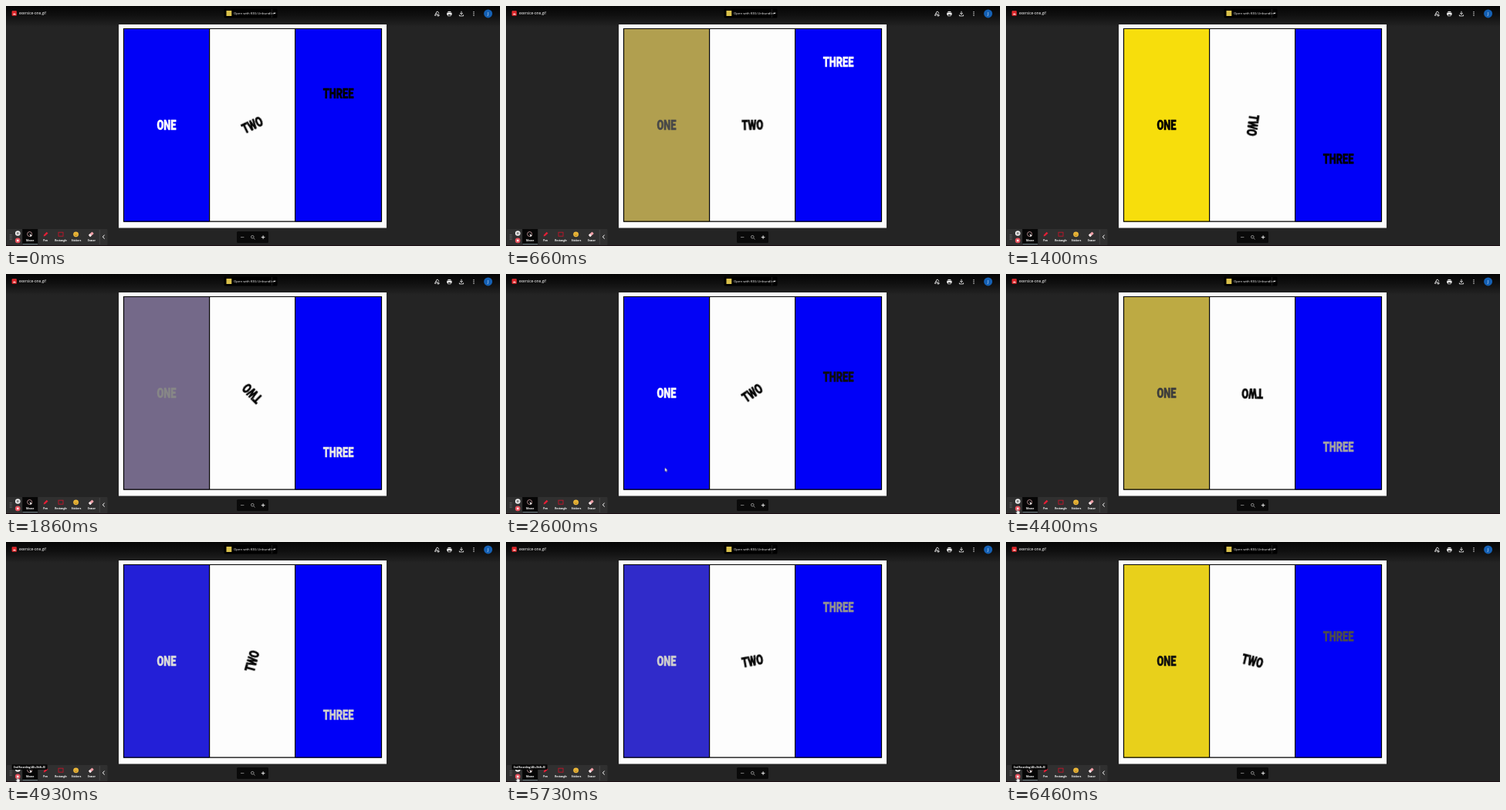
Write an HTML page that moves like this. It is 640x312 px and loops after 6530 ms.

```html
<!DOCTYPE html>
<html lang="en">
<head>
<meta charset="utf-8">
<title>exersice-one.gif</title>
<style>
  html, body { margin: 0; width: 100%; height: 100%; overflow: hidden; background: #242424; }
  svg { display: block; width: 100vw; height: 100vh; }
  text { font-family: "Open Sans", Roboto, sans-serif; fill: #fff; }
  .mid { text-anchor: middle; }
  .label { font-size: 3.2px; font-weight: 700; text-anchor: middle; }
  .word {
    font: 900 18px Roboto, Inter, sans-serif;
    text-anchor: middle;
    transform: scale(.71, 1);
    stroke-width: .5px;
  }

  .anim { animation: 2717ms ease infinite paused; }
  .panel { animation-name: panel; animation-delay: -2627ms; }
  .one { animation-name: ink; animation-delay: -2627ms; }
  .spin { animation-name: spin; animation-delay: -1834ms; }
  .slide { animation-name: slide; animation-delay: -1964ms; }
  .three { animation-name: blink; animation-delay: -1964ms; }

  @keyframes panel { 0%, 100% { fill: #0000f8; } 50% { fill: #f7de0c; } }
  @keyframes ink { 0%, 100% { fill: #fff; stroke: #fff; } 50% { fill: #000; stroke: #000; } }
  @keyframes blink {
    0%, 50%, 100% { fill: #fff; stroke: #fff; }
    25%, 75% { fill: #000; stroke: #000; }
  }
  @keyframes spin { from { transform: rotate(0deg); } to { transform: rotate(360deg); } }
  @keyframes slide {
    0%, 100% { transform: translate(430.5px, 72px); }
    50% { transform: translate(430.5px, 235px); }
  }

  /* pointer and tooltips run once per loop */
  .ui { animation: 6530ms linear infinite paused; }
  .show { animation-timing-function: step-end; }
  .pointer { animation-name: travel; }
  .arrow { animation-name: arrow; }
  .hand { animation-name: hand; }
  .tip-mouse { animation-name: tip-mouse; }
  .tip-end { animation-name: tip-end; }

  @keyframes travel {
    0%, 36.7% { transform: translate(214px, 226px); }
    39.8% { transform: translate(206px, 251.5px); }
    46% { transform: translate(110px, 284px); }
    51%, 64% { transform: translate(32.5px, 306px); }
    67%, 100% { transform: translate(14.8px, 306px); }
  }
  @keyframes arrow { 0% { opacity: 0; } 37% { opacity: 1; } 50%, 100% { opacity: 0; } }
  @keyframes hand { 0% { opacity: 0; } 50%, 100% { opacity: 1; } }
  @keyframes tip-mouse { 0% { opacity: 0; } 53% { opacity: 1; } 65%, 100% { opacity: 0; } }
  @keyframes tip-end { 0% { opacity: 0; } 69%, 100% { opacity: 1; } }
</style>
</head>
<body>
<svg viewBox="0 0 640 312" preserveAspectRatio="none">
  <defs>
    <linearGradient id="shade" x2="0" y2="1">
      <stop offset="0" stop-color="#050505"/>
      <stop offset=".45" stop-color="#101010"/>
      <stop offset="1" stop-color="#242424"/>
    </linearGradient>
  </defs>

  <rect width="640" height="312" fill="#242424"/>
  <rect width="640" height="27" fill="url(#shade)"/>
  <path d="M0 311.5H640" stroke="#1b0d13"/>

  <!-- header -->
  <rect x="7.6" y="6.3" width="6.2" height="6.4" rx=".8" fill="#e0282c"/>
  <path d="M9 11.2l1.2-1.6 1 1 .7-.9 1 1.5z" fill="#fff"/>
  <text x="17" y="11.2" font-size="4.8">exersice-one.gif</text>

  <rect x="282.5" y="3.5" width="69" height="12" rx="1.5" fill="#000"/>
  <rect x="285.5" y="6" width="6.8" height="7" fill="#d9c04a"/>
  <text x="295" y="11.2" font-size="4.3">Open with KEG Unbundler</text>
  <path d="M344.5 4V15" stroke="#333" stroke-width=".6"/>
  <path d="M346.4 8.8h3.2l-1.6 1.8z" fill="#fff"/>

  <g fill="none" stroke="#eee" stroke-width=".9">
    <path d="M557.4 12.3h-1.9l2.6-5h1.4l1.4 2.4M556.6 10.6h2.6M560 10.4v3.4M558.3 12.1h3.6"/>
    <path d="M590 6.8v4M588.2 9.2l1.8 1.8 1.8-1.8M587.4 11.4v1.5h5.2v-1.5"/>
  </g>
  <g fill="#eee">
    <path d="M572.4 7h4v1.3h-4zM571.2 8.7h6.4v3h-1.2v1.5h-4v-1.5h-1.2z"/>
    <circle cx="606" cy="7.7" r=".7"/>
    <circle cx="606" cy="10" r=".7"/>
    <circle cx="606" cy="12.3" r=".7"/>
  </g>
  <path d="M573 11h2.8v1.5h-2.8z" fill="#111"/>
  <circle cx="624.6" cy="9.9" r="5.5" fill="#1460b4"/>
  <text class="mid" x="624.6" y="11.8" font-size="5.4">J</text>

  <!-- page -->
  <rect x="146" y="24" width="347" height="264.5" fill="#fdfdfd"/>
  <rect class="anim panel" x="152.5" y="29.5" width="111" height="251"/>
  <rect x="374.5" y="29.5" width="112" height="251" fill="#0000f8"/>
  <path d="M152.5 29.5H486.5V280.2H152.5zM263.6 29.5V280M374.6 29.5V280" fill="none" stroke="#000" stroke-width="1.2"/>

  <g transform="translate(208 155)"><text class="word anim-scope" y="6.4"><tspan class="anim one">ONE</tspan></text></g>
  <g transform="translate(319.3 155)">
    <g class="anim spin"><text class="word" y="6.4" style="fill:#000;stroke:#000">TWO</text></g>
  </g>
  <g class="anim slide"><text class="word" y="6.4"><tspan class="anim three">THREE</tspan></text></g>

  <!-- zoom -->
  <rect x="299" y="293" width="41" height="15" rx="1.5" fill="#0a0a0a"/>
  <g fill="none" stroke-width=".9">
    <path d="M304 300.6h4.4" stroke="#888"/>
    <path d="M320.7 301.6l1.8 1.8" stroke="#999"/>
    <circle cx="319.3" cy="300.2" r="1.8" stroke="#999"/>
    <path d="M330.8 300.6h4.6M333.1 298.3v4.6" stroke="#fff"/>
  </g>

  <!-- recorder bar -->
  <rect x="1" y="290" width="130.5" height="21" rx="1" fill="#303030"/>
  <rect x="21.2" y="290" width="20" height="20.6" fill="#060606"/>
  <path d="M21.5 309.7h19.5" stroke="#a9bcc4" stroke-width=".8"/>
  <path d="M5.3 297v7M7.1 297v7" stroke="#888" stroke-width=".8" stroke-dasharray=".9 1.1"/>
  <circle cx="15.3" cy="295.5" r="3.3" fill="#f2f2f2"/>
  <path d="M14.5 294v3M16.2 294v3" stroke="#333" stroke-width=".8"/>
  <circle cx="15.2" cy="304.9" r="3.3" fill="#e8515d"/>
  <rect x="14" y="303.7" width="2.4" height="2.4" fill="#fff"/>

  <circle cx="30.6" cy="296.5" r="3" fill="none" stroke="#d5a5a8" stroke-width=".8"/>
  <path d="M30.6 295.8l3.4 3.2-1.6.2-.6 1.4z" fill="#fff"/>
  <path d="M48.6 299.6l.5-2 3.6-3.8 1.8 1.7-3.8 3.6z" fill="#e21f36"/>
  <rect x="68" y="294.2" width="6" height="5" fill="none" stroke="#c4142a" stroke-width=".9"/>
  <circle cx="90.6" cy="296.8" r="3.4" fill="#f3bd3a"/>
  <path d="M89 296h.8M91.4 296h.8M88.8 297.6q1.8 1.8 3.6 0" fill="none" stroke="#6b4310" stroke-width=".6"/>
  <g transform="rotate(-42 110.4 296.8)">
    <rect x="107.2" y="295.2" width="6.4" height="3.2" rx=".6" fill="#f0a0a8"/>
    <rect x="107.2" y="295.2" width="2.4" height="3.2" rx=".6" fill="#eee"/>
  </g>
  <g class="label">
    <text x="31.2" y="305.6">Mouse</text>
    <text x="51.2" y="305.6">Pen</text>
    <text x="71" y="305.6">Rectangle</text>
    <text x="91" y="305.6">Stickers</text>
    <text x="111" y="305.6">Eraser</text>
  </g>
  <path d="M121.3 291V310" stroke="#555" stroke-width=".6"/>
  <path d="M127.6 297.6l-2.2 2.5 2.2 2.5" fill="none" stroke="#fff"/>

  <g class="ui show tip-mouse">
    <rect x="19" y="278" width="25" height="7" rx=".8" fill="#080808"/>
    <text class="label" x="31.3" y="282.4">Mouse Pointer</text>
  </g>
  <g class="ui show tip-end">
    <rect x="7.6" y="289.3" width="46" height="6.6" rx=".8" fill="#080808"/>
    <text class="label" x="30.5" y="293.7" style="font-size:3px">End Recording (Alt+Shift+R)</text>
  </g>

  <g class="ui pointer">
    <path class="ui show arrow" d="M0 0v5.2l1.2-1 .8 1.8 1-.4-.8-1.8h1.6z" fill="#fff" stroke="#111" stroke-width=".3"/>
    <path class="ui show hand" d="M-.6 0q.6-.8 1.2 0v2l2 .5q.7.3.5 1.2l-.5 2.3h-3l-1.8-2.4q.3-.8 1.6 0z" fill="#fff" stroke="#222" stroke-width=".3"/>
  </g>
</svg>
<script>
  const LOOP = 6530, FPS = 15, HELD = 50;
  const anims = document.getAnimations();
  const start = performance.now();

  function draw() {
    const t = (performance.now() - start) % LOOP;
    let step = Math.floor((t + 6.7) * FPS / 1000);
    if (step === HELD) step--;
    const time = Math.min(step * 1000 / FPS, LOOP - 1);
    for (const a of anims) a.currentTime = time;
    requestAnimationFrame(draw);
  }
  draw();
</script>
</body>
</html>
```
